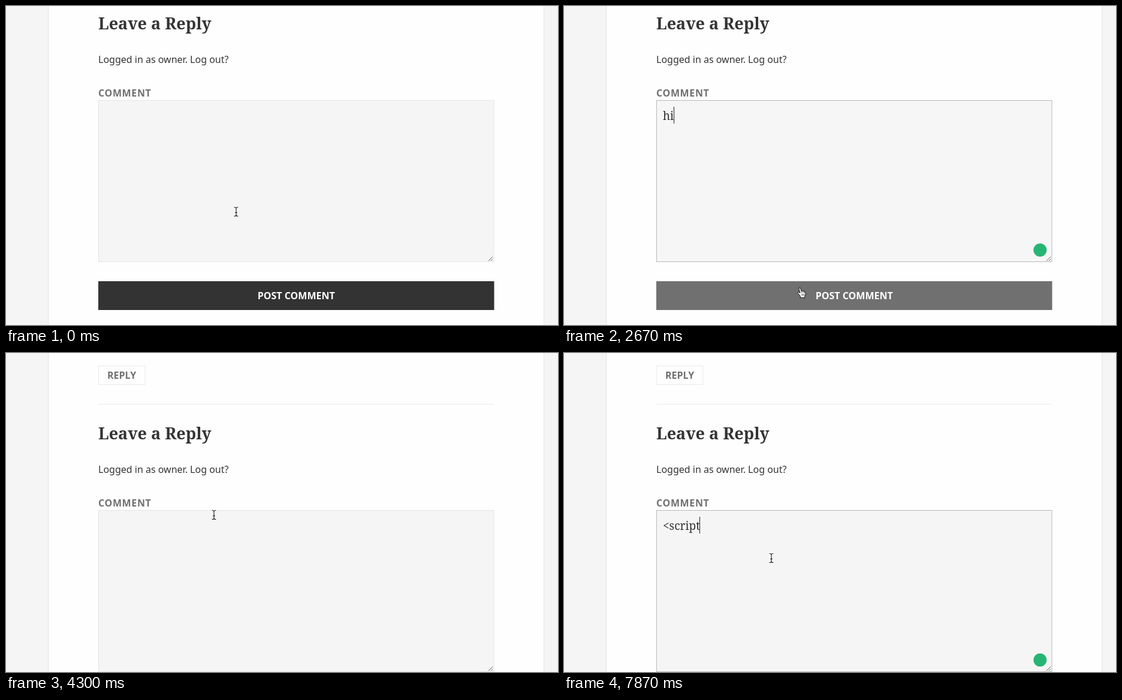
These frames come from a looping animation (921 by 532 pixels, 8000 ms). An HTML page:

```html
<!DOCTYPE html>
<html lang="en">
<head>
<meta charset="utf-8">
<title>Comment form</title>
<style>
  html, body { margin: 0; width: 100%; height: 100%; overflow: hidden; background: #f5f5f5; }
  svg { display: block; width: 921px; height: 532px; }
  text { font: 16px "Noto Sans", sans-serif; fill: #333; }
  .bold { font-weight: 700; }
  .muted { fill: #707070; }
  .title { font: 700 27px "Noto Serif", serif; }
  #entry { font: 19px "Noto Serif", serif; }
</style>
</head>
<body>
<svg viewBox="0 0 921 532">
  <rect x="70" width="828" height="532" fill="#e6e6e6"/>
  <rect x="71.3" width="825.7" height="532" fill="#fefefe"/>

  <g id="page">
    <rect x="154.5" y="-83.5" width="77.5" height="31" fill="none" stroke="#eaeaea"/>
    <text class="bold muted" x="169" y="-62">REPLY</text>
    <path d="M154 -19.5H814.5" stroke="#eaeaea"/>
    <text class="title" x="154" y="39">Leave a Reply</text>
    <text x="154" y="95">Logged in as owner. Log out?</text>
    <text class="bold muted" x="154" y="151" letter-spacing=".64">COMMENT</text>

    <rect id="field" x="154.5" y="157.5" width="659.5" height="269"/>
    <text id="entry" x="165" y="190"></text>
    <rect id="caret" y="168" width="1" fill="#222"/>
    <circle id="badge" cx="794.3" cy="407" r="11" fill="#26b573"/>
    <path d="M805 425l7-7M809 425l3-3" stroke="#666"/>

    <rect id="button" x="154" y="459" width="660.5" height="48"/>
    <text class="bold" x="484.2" y="489" text-anchor="middle" style="fill:#fff">POST COMMENT</text>
  </g>

  <g id="cursor" stroke-linejoin="round" stroke-linecap="round">
    <g id="beam" fill="none">
      <path id="stem" d="M-3 -7.5Q0 -7.5 0 -5.5Q0 -7.5 3 -7.5M0 -5.5V5.5M-3 7.5Q0 7.5 0 5.5Q0 7.5 3 7.5M-1.5 1.5H1.5" stroke="#fff" stroke-width="2.4"/>
      <use href="#stem"/>
      <path d="M-3 -7.5Q0 -7.5 0 -5.5Q0 -7.5 3 -7.5M0 -5.5V5.5M-3 7.5Q0 7.5 0 5.5Q0 7.5 3 7.5M-1.5 1.5H1.5" stroke="#111" stroke-width="1.1"/>
    </g>
    <g id="hand" stroke="#111">
      <path d="M-1.5 8L-2 5.5L-6 .5Q-6.5 -1.5 -4 -1L-2 1L-4 -6.5Q-3.8 -9 -1.8 -8L0 -2.5Q1.3 -4 2.6 -2.3Q4 -3.3 5 -1.6Q6.8 -2 7 0V4L5.7 6.5V8Z" fill="#fff"/>
      <path d="M0 -2.5L.7 0M2.6 -2.3L3 0M5 -1.6L5.2 .3M1 2.2V5M3 2.2V5M5 2.2V5" fill="none" stroke-width=".7"/>
    </g>
    <path id="arrow" d="M.5 .5V14L3.6 11.2L5.7 16L8 15L6 10.4H10Z" fill="#000" stroke="#fff"/>
  </g>
</svg>

<script>
const LOOP = 8000;
const el = id => document.getElementById(id);
const at = (x, y) => ({ x, y });

// Each step changes part of the state and holds until the next one.
const steps = [
  [0, { ...at(384, 343), cursor: 'beam', scroll: 0, focus: false, fill: '#f5f5f5',
        text: '', caret: false, badge: false, hover: false }],
  [150, at(353, 265)],
  [450, { ...at(347, 257), focus: true, caret: true, fill: '#f9f9f9' }],
  [590, { fill: '#fefefe' }],
  [740, { badge: true }],
  [1040, { caret: false }],
  [1330, { text: 'h', caret: true }],
  [1480, { text: 'hi' }],
  [1930, { caret: false }],
  [2370, { ...at(352, 290), caret: true, fill: '#f6f6f6' }],
  [2520, at(380, 405)],
  [2670, { ...at(396, 478), cursor: 'hand', hover: true }],
  [2970, { caret: false }],
  [3120, { focus: false }],
  [3710, at(394, 472)],
  [3860, { ...at(374, 436), cursor: 'arrow' }],
  [4000, at(345, 375)],
  [4150, at(328, 333)],
  [4300, { ...at(347, 270), cursor: 'beam', scroll: 105, text: '', badge: false,
           hover: false, fill: '#f5f5f5' }],
  [4450, at(356, 266)],
  [4600, at(372, 264)],
  [4750, at(396, 290)],
  [4900, at(345, 317)],
  [5490, { ...at(340, 317), focus: true, caret: true, fill: '#f7f7f7' }],
  [5640, { ...at(341, 263), fill: '#f5f5f5' }],
  [5930, { ...at(344, 300), caret: false }],
  [6080, at(346, 342)],
  [6530, { text: '<', caret: true }],
  [6680, { badge: true }],
  [6830, { text: '<s' }],
  [6970, { text: '<sc' }],
  [7120, { text: '<scr' }],
  [7270, { text: '<scri' }],
  [7420, { text: '<scrip' }],
  [7720, { text: '<script' }]
];

const show = (id, on) => el(id).setAttribute('visibility', on ? 'visible' : 'hidden');
const set = (id, attrs) => {
  for (const name in attrs) el(id).setAttribute(name, attrs[name]);
};

function draw(time) {
  const s = Object.assign({}, ...steps.filter(([start]) => start <= time).map(step => step[1]));
  set('page', { transform: `translate(0 ${s.scroll})` });
  set('field', { fill: s.fill, stroke: s.focus ? '#b8b8b8' : '#e5e5e5' });
  set('button', { fill: s.hover ? '#707070' : '#333' });

  const entry = el('entry');
  entry.textContent = s.text;
  entry.style.fill = s.focus ? '#333' : '#707070';
  const width = s.text ? entry.getComputedTextLength() : 0;
  set('caret', { x: Math.floor(165 + width), height: s.text ? 28 : 31 });
  show('caret', s.caret);
  show('badge', s.badge);

  set('cursor', { transform: `translate(${s.x} ${s.y})` });
  for (const kind of ['beam', 'hand', 'arrow']) show(kind, kind === s.cursor);
}

const begin = performance.now();
function tick() {
  draw((performance.now() - begin) % LOOP);
  requestAnimationFrame(tick);
}
tick();
</script>
</body>
</html>
```
